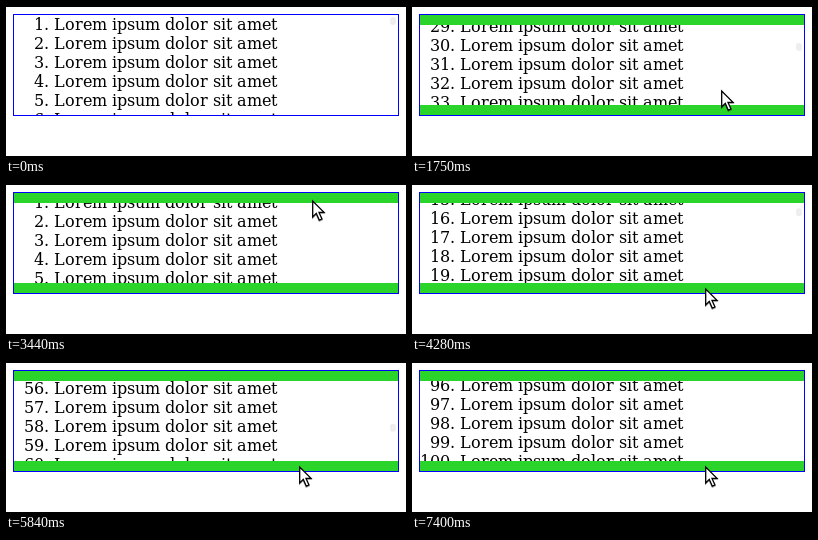
An HTML page that plays this animation: 400 px wide and 150 px high, repeating every 7670 ms.

```html
<!DOCTYPE html>
<html lang="en">
<head>
<meta charset="utf-8">
<title>Edge scrolling list</title>
<style>
  html, body { margin: 0; width: 100%; height: 100%; overflow: hidden; background: #fff; }
  .stage { position: relative; width: 400px; height: 150px; overflow: hidden; border-top: 1px solid #000; box-sizing: border-box; }
  .box { position: absolute; left: 7px; top: 7px; width: 384px; height: 100px; border: 1px solid #00f; overflow: hidden; }
  ol { margin: 0; padding: 0 0 0 40px; list-style: none; font: 16px/19px "DejaVu Serif", serif; color: #000; white-space: pre; }
  li { position: relative; height: 19px; }
  .number { position: absolute; right: 100%; }
  .thumb { position: absolute; left: 376px; top: 2px; width: 6px; height: 8px; border-radius: 3px; background: #eee; }
  .zone { position: absolute; left: 0; width: 100%; height: 10px; background: #2bd42b; }
  .top { top: 0; }
  .bottom { bottom: 0; }
  .cursor { position: absolute; left: 0; top: -1px; width: 14px; height: 22px; overflow: visible; filter: drop-shadow(.5px 1px .5px rgba(0, 0, 0, .35)); }
</style>
</head>
<body>
<div class="stage">
  <div class="box">
    <ol id="list"></ol>
    <div class="thumb" id="thumb"></div>
    <div id="zones">
      <div class="zone top"></div>
      <div class="zone bottom"></div>
    </div>
  </div>
  <svg class="cursor" id="cursor" viewBox="0 0 14 22">
    <path d="M.7 1V17L4.3 13.4 7.3 20.2 10 19 7 12.4H12Z" fill="#fff" stroke="#000" stroke-width="1.3"/>
  </svg>
</div>
<script>
  const LOOP = 7670, ROWS = 100, MAX_SCROLL = 1800, THUMB_TRAVEL = 88;
  const ENTER = 390, ZONES_ON = 630;
  const SPEED = 0.492; // scrolled pixels per ms
  const $ = id => document.getElementById(id);
  const list = $("list"), thumb = $("thumb"), zones = $("zones"), cursor = $("cursor");

  const clamp = (v, lo, hi) => Math.min(hi, Math.max(lo, v));
  const pen = document.createElement("canvas").getContext("2d");
  pen.font = '16px "DejaVu Serif", serif';

  // Sets text with every advance rounded to a whole pixel.
  function hinted(text, className) {
    const line = document.createElement("span");
    line.className = className;
    for (const char of text) {
      const glyph = document.createElement("span");
      const advance = pen.measureText(char).width;
      glyph.textContent = char;
      glyph.style.letterSpacing = `${Math.round(advance) - advance}px`;
      line.append(glyph);
    }
    return line;
  }

  for (let i = 1; i <= ROWS; i++) {
    const row = document.createElement("li");
    row.append(hinted(`${i}. `, "number"), hinted("Lorem ipsum dolor sit amet", "label"));
    list.append(row);
  }

  // Down, back up to the start, then down to the end.
  function scrollAt(t) {
    const run = (from, to) => SPEED * (clamp(t, from, to) - from);
    const firstTrip = Math.max(0, run(643, 1720) - run(2048, 3400));
    return Math.round(Math.min(MAX_SCROLL, firstTrip + run(3733, LOOP)));
  }

  // The pointer enters at the lower right, then glides up and down again.
  const origin = { x: 392, y: 146 };
  const glides = [
    { from: 370, to: 670, x: -82, y: -45 },
    { from: 1660, to: 1980, x: -4, y: -87 },
    { from: 3400, to: 3850, x: -13, y: 90 }
  ];

  function pointerAt(t, axis) {
    const move = g => {
      const p = clamp((t - g.from) / (g.to - g.from), 0, 1);
      return g[axis] * p * p * (3 - 2 * p);
    };
    return Math.round(glides.reduce((sum, g) => sum + move(g), origin[axis]));
  }

  // The picture advances in 40 ms steps, with a phase shift after each pause.
  function snap(t) {
    const phase = t < 1990 ? 30 : t < 3170 ? 10 : 0;
    return Math.floor((t - phase) / 40) * 40 + phase;
  }

  function draw(now) {
    const t = snap(now % LOOP);
    const scroll = scrollAt(t);
    list.style.transform = `translateY(${-scroll}px)`;
    thumb.style.transform = `translateY(${THUMB_TRAVEL * scroll / MAX_SCROLL}px)`;
    zones.style.visibility = t >= ZONES_ON ? "visible" : "hidden";
    cursor.style.visibility = t >= ENTER ? "visible" : "hidden";
    cursor.style.transform = `translate(${pointerAt(t, "x")}px, ${pointerAt(t, "y")}px)`;
  }

  const start = performance.now();
  function tick() {
    draw(performance.now() - start);
    requestAnimationFrame(tick);
  }
  tick();
</script>
</body>
</html>
```
